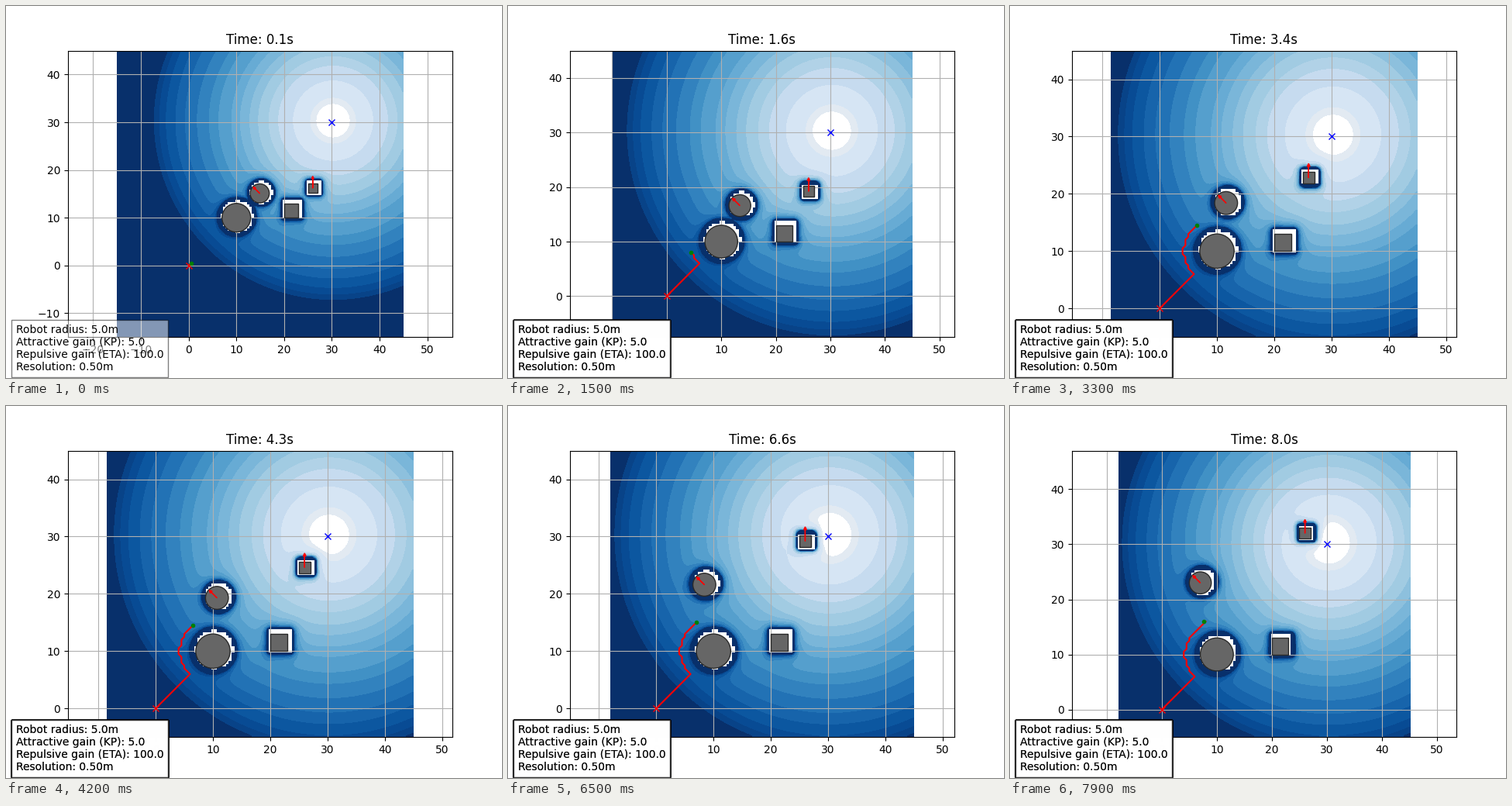
Animation, 640 px wide and 480 px high, one loop 8000 ms. Source, as a matplotlib script:

```python
import numpy as np
import matplotlib.pyplot as plt
from matplotlib.animation import FuncAnimation
from matplotlib.colors import ListedColormap
from matplotlib.patches import Circle, Rectangle

KP, ETA = 5.0, 100.0
RESO, RADIUS, MARGIN = 0.5, 5.0, 15.0
DT, FRAMES = 0.1, 80
START, GOAL = (0.0, 0.0), (30.0, 30.0)
MOVES = [(1, 0), (0, 1), (-1, 0), (0, -1), (-1, -1), (-1, 1), (1, -1), (1, 1)]
LAYERS = 20  # the caption is stamped once more per step, up to this many


class Obstacle:
    def __init__(self, kind, x, y, size, vx=0.0, vy=0.0):
        self.kind, self.x, self.y, self.size = kind, x, y, size
        self.vx, self.vy = vx, vy
        self.moving = bool(vx or vy)

    def distance(self, x, y):
        dx, dy = np.abs(x - self.x), np.abs(y - self.y)
        if self.kind == "circle":
            return np.hypot(dx, dy) - self.size
        return np.hypot(np.maximum(dx - self.size, 0), np.maximum(dy - self.size, 0))

    def advance(self):
        self.x += self.vx * DT
        self.y += self.vy * DT


def potential(obstacles, rx, ry):
    """Potential on the grid around robot, goal and obstacles, with its extent."""
    xs = [o.x for o in obstacles] + [rx, GOAL[0]]
    ys = [o.y for o in obstacles] + [ry, GOAL[1]]
    x0, y0 = min(xs) - MARGIN, min(ys) - MARGIN
    nx = int(round((max(xs) + MARGIN - x0) / RESO))
    ny = int(round((max(ys) + MARGIN - y0) / RESO))
    x, y = np.meshgrid(np.arange(nx) * RESO + x0, np.arange(ny) * RESO + y0)
    dq = np.min([o.distance(x, y) for o in obstacles], axis=0)
    near = np.maximum(dq, 0.1)
    repel = np.where(near <= RADIUS, 0.5 * ETA * (1 / near - 1 / RADIUS) ** 2, 0)
    field = 0.5 * KP * np.hypot(x - GOAL[0], y - GOAL[1]) + repel
    field[dq <= 0] = np.nan
    return field, (x0, x0 + nx * RESO, y0, y0 + ny * RESO)


def simulate():
    obstacles = [
        Obstacle("circle", 10.0, 10.0, 3.0),
        Obstacle("circle", 15.0, 15.0, 2.0, -1.0, 1.0),
        Obstacle("square", 21.5, 11.5, 1.5),
        Obstacle("square", 26.0, 16.0, 1.0, 0.0, 2.0),
    ]
    path, states = [START], []
    for _ in range(FRAMES):
        rx, ry = path[-1]
        field, extent = potential(obstacles, rx, ry)
        ix = int(round((rx - extent[0]) / RESO))
        iy = int(round((ry - extent[2]) / RESO))
        # wait while a moving obstacle is too close
        blocked = any(o.moving and np.hypot(o.x - rx, o.y - ry) < RADIUS + o.size - 1e-9
                      for o in obstacles)
        if not blocked:
            costs = [np.round(field[iy + dy, ix + dx], 9) for dx, dy in MOVES]
            dx, dy = MOVES[int(np.nanargmin(costs))]
            ix, iy = ix + dx, iy + dy
        path.append((ix * RESO + extent[0], iy * RESO + extent[2]))
        for o in obstacles:
            o.advance()
        states.append((field, extent, [(o.x, o.y) for o in obstacles]))
    return obstacles, np.array(path), states


def banded_blues():
    """Blues in uneven steps; edges are distances from the goal."""
    edges = np.array([0, 3.5, 4.8, 8.4, 11.5, 13.5, 15.7, 17.5, 19.5, 21.3, 24,
                      26, 28.5, 31, 33, 35, 36.4, 37.5, 40]) / 40
    colors = plt.get_cmap("Blues")((edges[:-1] + edges[1:]) / 2)
    colors[0] = (1, 1, 1, 1)
    colors[1, :3] = (0.89, 0.92, 0.95)
    colors[-1] = plt.get_cmap("Blues")(1.0)
    return ListedColormap(colors[np.digitize((np.arange(400) + 0.5) / 400, edges) - 1])


obstacles, path, states = simulate()

fig, ax = plt.subplots(figsize=(6.4, 4.8), dpi=100)
field, extent, _ = states[0]
image = ax.imshow(field, origin="lower", extent=extent, aspect="auto",
                  cmap=banded_blues(), interpolation="bilinear")
ax.grid(True)

style = dict(facecolor="#666666", edgecolor="#292929", linewidth=1)
shapes, arrows = [], []
for o in obstacles:
    if o.kind == "circle":
        shape = Circle((0, 0), o.size, zorder=1.6, **style)
    else:
        shape = Rectangle((0, 0), 2 * o.size, 2 * o.size, zorder=1.6, **style)
    shapes.append(ax.add_patch(shape))
    arrows.append(ax.arrow(0, 0, o.vx, o.vy, head_width=0.5, head_length=0.5,
                           color="red", zorder=1.7) if o.moving else None)

ax.plot(*START, "xr")
ax.plot(*GOAL, "xb")
trail, = ax.plot([], [], "-r")
robot, = ax.plot([], [], ".g")
title = ax.set_title("")

caption = (f"Robot radius: {RADIUS}m\nAttractive gain (KP): {KP}\n"
           f"Repulsive gain (ETA): {ETA}\nResolution: {RESO:.2f}m")
stamps = [fig.text(0.02, 0.02, caption, bbox=dict(facecolor="white", alpha=0.5))
          for _ in range(LAYERS)]


def set_view(extent):
    x0, x1, y0, y1 = extent
    box = ax.get_position()
    half = (y1 - y0) * (box.width * 640) / (box.height * 480) / 2
    mid = (x0 + x1) / 2
    ax.set_xlim(mid - half, mid + half)
    ax.set_ylim(y0, y1)


def update(i):
    field, extent, centers = states[i]
    image.set_data(field)
    image.set_extent(extent)
    image.set_clim(np.nanmin(field), 100)
    set_view(extent)
    for o, shape, arrow, (x, y) in zip(obstacles, shapes, arrows, centers):
        if o.kind == "circle":
            shape.center = (x, y)
        else:
            shape.set_xy((x - o.size, y - o.size))
        if arrow:
            arrow.set_data(x=x, y=y, dx=o.vx, dy=o.vy)
    trail.set_data(path[:i + 2, 0], path[:i + 2, 1])
    robot.set_data(path[i + 1:i + 2, 0], path[i + 1:i + 2, 1])
    title.set_text(f"Time: {(i + 1) * DT:.1f}s")
    for k, stamp in enumerate(stamps):
        stamp.set_visible(k <= i)
    return []


anim = FuncAnimation(fig, update, frames=FRAMES, interval=100, repeat=True,
                     repeat_delay=0, init_func=lambda: update(0))
plt.show()
```
